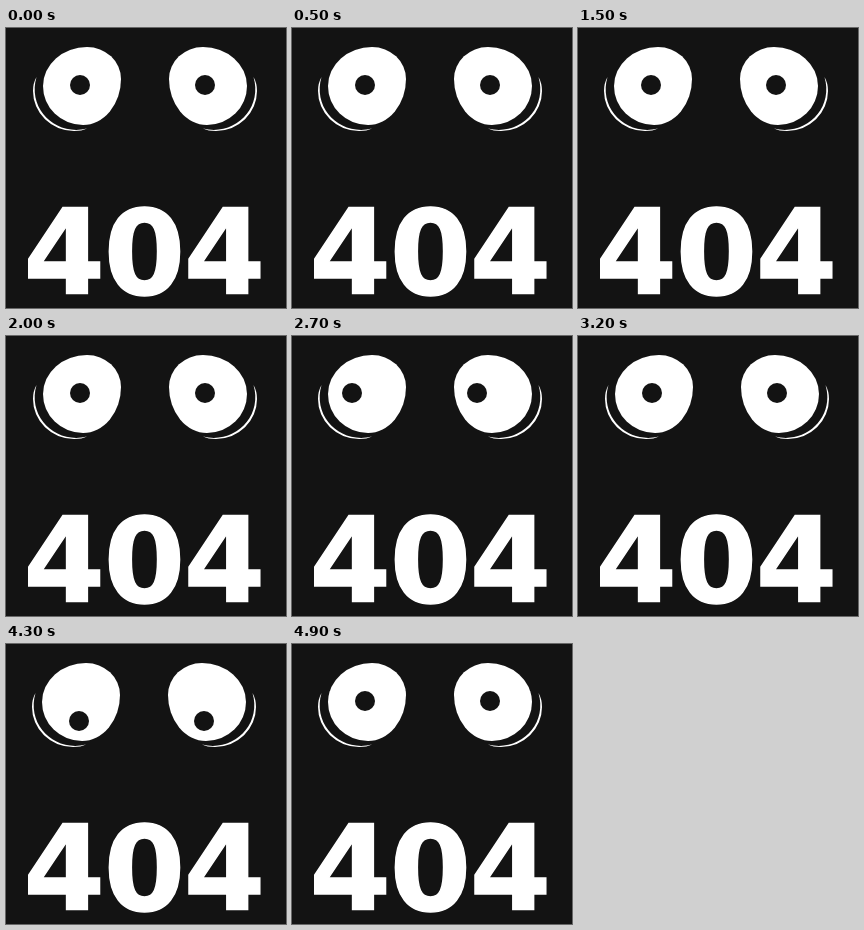
An HTML page for the animation above (5 s loop, 280x280 px).

```html
<!DOCTYPE html>
<html lang="en">
<head>
<meta charset="utf-8">
<title>404</title>
<style>
  html, body { margin: 0; width: 100%; height: 100%; overflow: hidden; background: #131313; }
  svg { display: block; width: 100%; height: 100%; }
  text {
    font: bold 117px "DejaVu Sans", sans-serif;
    text-anchor: middle;
    stroke: #fff;
    stroke-width: 1.5px;
  }
</style>
</head>
<body>
<svg viewBox="0 0 280 280" fill="#fff">
  <defs>
    <g id="eye">
      <path d="M36 58A44 39 0 0 1 80 19A34 32 0 0 1 114 51A38 46 0 0 1 76 97A40 39 0 0 1 36 58Z"/>
      <path d="M29.5 49Q26 55 26 63A41 40 0 0 0 67 103Q75 103 80 100.5C49 108.5 20 81 29.5 49Z"/>
    </g>
  </defs>
  <g id="eyes">
    <use href="#eye"/>
    <use href="#eye" transform="translate(276 0) scale(-1 1)"/>
    <g id="pupils" fill="#131313">
      <circle cx="73" cy="57" r="10"/>
      <circle cx="198" cy="57" r="10"/>
    </g>
  </g>
  <text x="58.3 138.5 218.5" y="266.2">404</text>
</svg>
<script>
  const LOOP = 5000, STEP = 100, MOVE = 200;
  const eyes = document.getElementById("eyes");
  const pupils = document.getElementById("pupils");

  // Each glance leaves the centre at `from` and is back at `to`
  const glances = [
    { from: 2300, to: 3200, x: -13, y: 0 },
    { from: 3900, to: 4700, x: 0, y: 20 }
  ];

  function smooth(p) {
    p = Math.min(1, Math.max(0, p));
    return p * p * (3 - 2 * p);
  }

  function look(t) {
    let x = 0, y = 0;
    for (const g of glances) {
      const amount = smooth(Math.min(t - g.from, g.to - t) / MOVE);
      x += g.x * amount;
      y += g.y * amount;
    }
    return [x, y];
  }

  function draw(now) {
    const step = Math.floor((now % LOOP) / STEP);
    eyes.setAttribute("transform", `translate(${step % 2 ? 0 : 1} 0)`);
    // The pupils tremble with the eyes
    pupils.setAttribute("transform", `translate(${look(step * STEP)})`);
  }

  const start = performance.now();
  function tick() {
    draw(performance.now() - start);
    requestAnimationFrame(tick);
  }
  tick();
</script>
</body>
</html>
```
